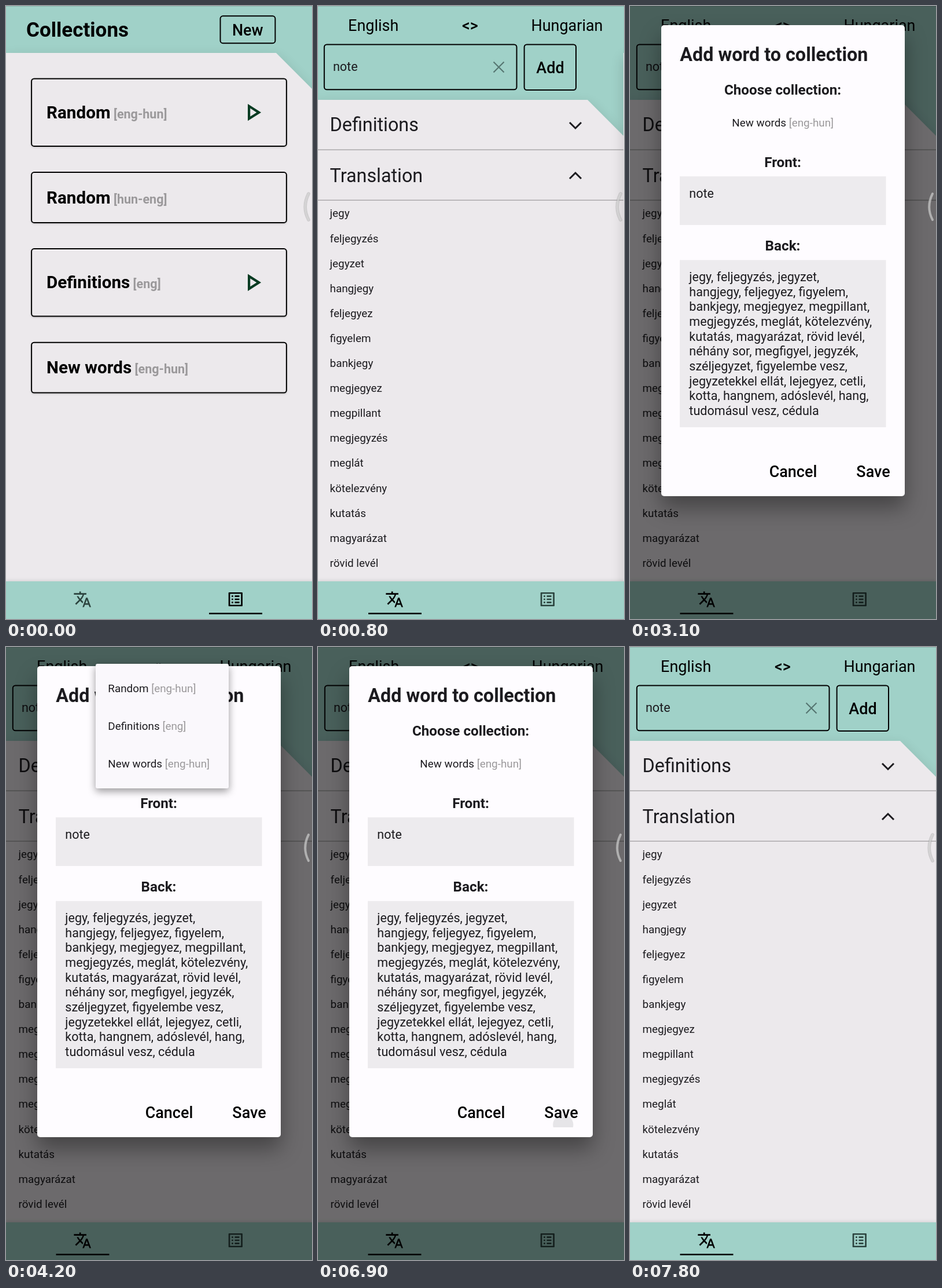
An HTML page with a canvas for the animation above (8 s loop, 529 by 1058 pixels).

```html
<!DOCTYPE html>
<html lang="en">
<head>
<meta charset="utf-8">
<title>Word collections</title>
<style>
  html, body { margin: 0; width: 100%; height: 100%; overflow: hidden; background: #ece9ec; }
  canvas { display: block; width: 529px; height: 1058px; }
</style>
</head>
<body>
<canvas id="stage"></canvas>
<script>
const W = 529, H = 1058, LOOP = 8000;
const DP = 1.347; // pixels per layout unit
const TEAL = '#a0d1c8', PAPER = '#ece9ec', INK = '#1c1b1f', GREY = '#9b999b';
const dpr = window.devicePixelRatio || 1;

function makeLayer(canvas) {
  canvas.width = W * dpr;
  canvas.height = H * dpr;
  const c = canvas.getContext('2d');
  c.scale(dpr, dpr);
  return c;
}
const screen = makeLayer(document.getElementById('stage'));
const layer = makeLayer(document.createElement('canvas'));
let g = screen;

const words = ['jegy', 'feljegyzés', 'jegyzet', 'hangjegy', 'feljegyez', 'figyelem',
  'bankjegy', 'megjegyez', 'megpillant', 'megjegyzés', 'meglát', 'kötelezvény',
  'kutatás', 'magyarázat', 'rövid levél'];
const backLines = ['jegy, feljegyzés, jegyzet,', 'hangjegy, feljegyez, figyelem,',
  'bankjegy, megjegyez, megpillant,', 'megjegyzés, meglát, kötelezvény,',
  'kutatás, magyarázat, rövid levél,', 'néhány sor, megfigyel, jegyzék,',
  'széljegyzet, figyelembe vesz,', 'jegyzetekkel ellát, lejegyez, cetli,',
  'kotta, hangnem, adóslevél, hang,', 'tudomásul vesz, cédula'];
const cards = [
  { name: 'Random', tag: '[eng-hun]', play: true },
  { name: 'Random', tag: '[hun-eng]' },
  { name: 'Definitions', tag: '[eng]', play: true },
  { name: 'New words', tag: '[eng-hun]' }
];
const choices = [
  ['Random', '[eng-hun]', 72], ['Definitions', '[eng]', 137], ['New words', '[eng-hun]', 201.5]
];

const playIcon = new Path2D('M10 8.64L15.27 12 10 15.36V8.64M8 5v14l11-7L8 5z');
const translateIcon = new Path2D('M12.87 15.07l-2.54-2.51.03-.03c1.74-1.94 2.98-4.17 3.71-6.53H17V4h-7V2H8v2H1v1.99h11.17C11.5 7.92 10.44 9.75 9 11.35 8.07 10.32 7.3 9.19 6.69 8h-2c.73 1.63 1.73 3.17 2.98 4.56l-5.09 5.02L4 19l5-5 3.11 3.11.76-2.04zM18.5 10h-2L12 22h2l1.12-3h4.75L21 22h2l-4.5-12zm-2.62 7l1.62-4.33L19.12 17h-3.24z');
const listIcon = new Path2D('M19 5v14H5V5h14m1.1-2H3.9c-.5 0-.9.4-.9.9v16.2c0 .4.4.9.9.9h16.2c.4 0 .9-.5.9-.9V3.9c0-.5-.5-.9-.9-.9zM11 7h6v2h-6zM11 11h6v2h-6zM11 15h6v2h-6zM7 7h2v2H7zM7 11h2v2H7zM7 15h2v2H7z');

const clamp = v => Math.max(0, Math.min(1, v));
const span = (t, a, b) => clamp((t - a) / (b - a));
const mix = (a, b, p) => a + (b - a) * p;
const easeOut = (p, power = 2) => 1 - (1 - p) ** power;

// Draws text centred vertically on y and returns its right end.
function text(str, x, y, size, { weight = 400, color = INK, align = 'left', lineSize = size } = {}) {
  g.font = `${weight} ${size * DP}px Roboto, sans-serif`;
  g.textAlign = align;
  g.fillStyle = color;
  g.fillText(str, x, y + lineSize * DP * 0.342);
  return x + g.measureText(str).width;
}

function label(name, tag, x, y, size, tagSize, weight) {
  const end = text(name, x, y, size, { weight, color: weight > 400 ? '#000' : INK });
  text(' ' + tag, end, y, tagSize, { weight, color: GREY, lineSize: size });
}

function roundRect(x1, y1, x2, y2, r) {
  g.beginPath();
  g.roundRect(x1, y1, x2 - x1, y2 - y1, r);
}

// The border lies inside the given box.
function outline(x1, y1, x2, y2) {
  roundRect(x1 + 1, y1 + 1, x2 - 1, y2 - 1, 4.5);
  g.strokeStyle = '#000';
  g.lineWidth = 2;
  g.stroke();
}

function fillShadow(color, blur, dy, alpha) {
  g.save();
  g.shadowColor = `rgba(0,0,0,${alpha})`;
  g.shadowBlur = blur * dpr;
  g.shadowOffsetY = dy * dpr;
  g.fillStyle = color;
  g.fill();
  g.restore();
}

function polyline(points, width, color) {
  g.beginPath();
  points.forEach(([x, y]) => g.lineTo(x, y));
  g.lineWidth = width;
  g.strokeStyle = color;
  g.stroke();
}

function icon(path, cx, cy, scale, color) {
  g.save();
  g.translate(cx - 12 * scale, cy - 12 * scale);
  g.scale(scale, scale);
  g.fillStyle = color;
  g.fill(path, 'evenodd');
  g.restore();
}

function ripple(x1, y1, x2, y2, cx, cy, r, alpha) {
  if (alpha <= 0) return;
  g.save();
  roundRect(x1, y1, x2, y2, 5);
  g.clip();
  g.beginPath();
  g.arc(cx, cy, r, 0, Math.PI * 2);
  g.fillStyle = `rgba(20,30,30,${alpha})`;
  g.fill();
  g.restore();
}

// Teal header above a sheet with its top right corner cut off.
function pageBase(top) {
  g.fillStyle = TEAL;
  g.fillRect(0, 0, W, H);
  g.beginPath();
  [[0, top], [467, top], [W, top + 62], [W, H], [0, H]].forEach(([x, y]) => g.lineTo(x, y));
  fillShadow(PAPER, 22, 8, 0.16);
}

function collectionsPage() {
  pageBase(81);
  text('Collections', 35, 41, 26, { weight: 700, color: '#000' });
  outline(369.5, 16.3, 466.4, 65.2);
  text('New', 417.7, 41.3, 20, { weight: 500, color: '#000', align: 'center' });
  const margin = 32 * DP;
  let top = 124.4;
  for (const c of cards) {
    const bottom = top + (c.play ? 88 : 66) * DP;
    const mid = (top + bottom) / 2;
    roundRect(margin, top, W - margin, bottom, 5.4);
    fillShadow(PAPER, 3, 1.5, 0.15);
    outline(margin, top, W - margin, bottom);
    label(c.name, c.tag, margin + 20 * DP, mid, 22, 16, 700);
    if (c.play) icon(playIcon, 426.4, mid, 2.1, '#083b22');
    top = bottom + margin;
  }
}

function translatePage(t) {
  pageBase(162);
  const mid = { color: '#000', align: 'center' };
  const indent = 16 * DP;
  text('English', 96.7, 34, 20, mid);
  text('<>', 263.8, 34, 20, { ...mid, weight: 500 });
  text('Hungarian', 431.5, 34, 20, mid);
  outline(10.8, 65.5, 345.5, 145.3);
  text('note', 26.9, 104.5, 16);
  const cross = '#557570';
  polyline([[304.5, 96.5], [322.5, 114.5]], 2.2, cross);
  polyline([[322.5, 96.5], [304.5, 114.5]], 2.2, cross);

  const p = span(t, 980, 1480);
  const fade = Math.min(span(t, 980, 1040), 1 - span(t, 1460, 1600));
  ripple(357, 66, 448, 145, 402.5, 106, mix(18, 62, p), 0.1 * fade);
  outline(356.6, 65.5, 448, 146);
  text('Add', 402.5, 106.5, 20, { ...mid, weight: 500 });

  text('Definitions', indent, 205, 24);
  text('Translation', indent, 292.5, 24);
  polyline([[436, 201], [446, 211], [456, 201]], 3, INK);
  polyline([[436, 298], [446, 288], [456, 298]], 3, INK);
  g.fillStyle = '#a19fa1';
  g.fillRect(0, 247.5, W, 1.3);
  g.fillRect(0, 334.5, W, 1.3);
  words.forEach((w, i) => text(w, indent, 358 + i * 32 * DP, 14));
}

function navBar(p) {
  g.beginPath();
  g.rect(0, 993, W, 65);
  fillShadow(TEAL, 6, -1, 0.12);
  const active = '#000', idle = '#2c443f';
  icon(translateIcon, 132.2, 1024, DP, p > 0.5 ? active : idle);
  icon(listIcon, 396.8, 1024, DP, p > 0.5 ? idle : active);
  g.fillStyle = '#000';
  g.fillRect(mix(351, 86.5, p), 1047.3, 92, 2.5);
}

function dialog(t) {
  roundRect(54, 33, 475, 846, 5);
  fillShadow('#fefcff', 36, 20, 0.36);
  const head = { weight: 700, align: 'center' };
  text('Add word to collection', 86.2, 84, 24, { weight: 700 });
  text('Choose collection:', 264, 144.5, 18, head);
  label('New words', '[eng-hun]', 176.3, 201.5, 14, 14, 400);
  text('Front:', 264, 270, 18, head);
  text('Back:', 264, 414, 18, head);
  g.fillStyle = '#edebee';
  g.fillRect(86, 294, 356.5, 84);
  g.fillRect(86, 438.5, 356.5, 288.5);
  const indent = 86.2 + 12 * DP;
  text('note', indent, 323.5, 16);
  backLines.forEach((line, i) => text(line, indent, 467.8 + i * 25.62, 16));

  const p = span(t, 6860, 7500);
  ripple(384, 779, 457, 829, mix(424, 420.5, p), mix(826, 804, p), mix(15.5, 48, p), 0.1 * span(t, 6860, 6890));
  const button = { weight: 500, color: '#000', align: 'center' };
  text('Cancel', 282, 804, 20, button);
  text('Save', 420.5, 804, 20, button);
}

function menu(t) {
  const p = span(t, 3780, 4180);
  const grow = span(p, 0.25, 0.5);
  g.save();
  roundRect(155, mix(169, 29, grow), 385, mix(234, 244, grow), 3);
  fillShadow('#faf8fc', 14, 5, 0.4);
  g.clip();
  const unit = 0.5 / 4.5, alpha = g.globalAlpha;
  choices.forEach(([name, tag, y], i) => {
    const start = 0.5 + (i + 1) * unit;
    // The chosen row is visible from the beginning.
    g.globalAlpha = alpha * (i === 2 ? 1 : span(p, start, Math.min(1, start + 1.5 * unit)));
    label(name, tag, 176.3, y, 14, 14, 400);
  });
  g.restore();
}

// Paints a whole group at one opacity.
function group(alpha, paint) {
  if (alpha <= 0) return;
  g = layer;
  g.clearRect(0, 0, W, H);
  paint();
  g = screen;
  g.globalAlpha = alpha;
  g.drawImage(layer.canvas, 0, 0, W, H);
  g.globalAlpha = 1;
}

function edgeHandle() {
  g.lineCap = 'round';
  for (const [width, color] of [[5.5, 'rgba(110,110,110,.3)'], [4, 'rgba(222,222,222,.6)']]) {
    g.beginPath();
    g.moveTo(523, 324);
    g.quadraticCurveTo(511.5, 347, 523, 369);
    g.lineWidth = width;
    g.strokeStyle = color;
    g.stroke();
  }
  g.lineCap = 'butt';
}

function draw(t) {
  // Critically damped swipe between the two pages.
  const x = Math.max(0, t - 60) / 87;
  const left = t < 100 ? 1 : (1 + x) * Math.exp(-x);
  const gap = Math.round(left * W);

  if (gap < W) {
    g.save();
    g.translate(-gap, 0);
    translatePage(t);
    g.restore();
  }
  if (gap > 0) {
    g.save();
    g.beginPath();
    g.rect(0, 0, W, H);
    g.clip();
    g.translate(W - gap, 0);
    collectionsPage();
    g.restore();
  }
  navBar(1 - gap / W);
  g.fillStyle = 'rgba(0,0,0,.14)';
  g.fillRect(0, 0, W, 1);

  const shown = Math.min(span(t, 1490, 1660), 1 - span(t, 7530, 7770));
  if (shown > 0) {
    g.fillStyle = `rgba(0,0,0,${0.54 * easeOut(shown, 2.5)})`;
    g.fillRect(0, 0, W, H);
    group(easeOut(shown), () => dialog(t));
  }
  group(Math.min(span(t, 3780, 3880), 1 - span(t, 5470, 5560)), () => menu(t));
  edgeHandle();
}

const start = performance.now();
function tick() {
  draw((performance.now() - start) % LOOP);
  requestAnimationFrame(tick);
}
tick();
</script>
</body>
</html>
```
